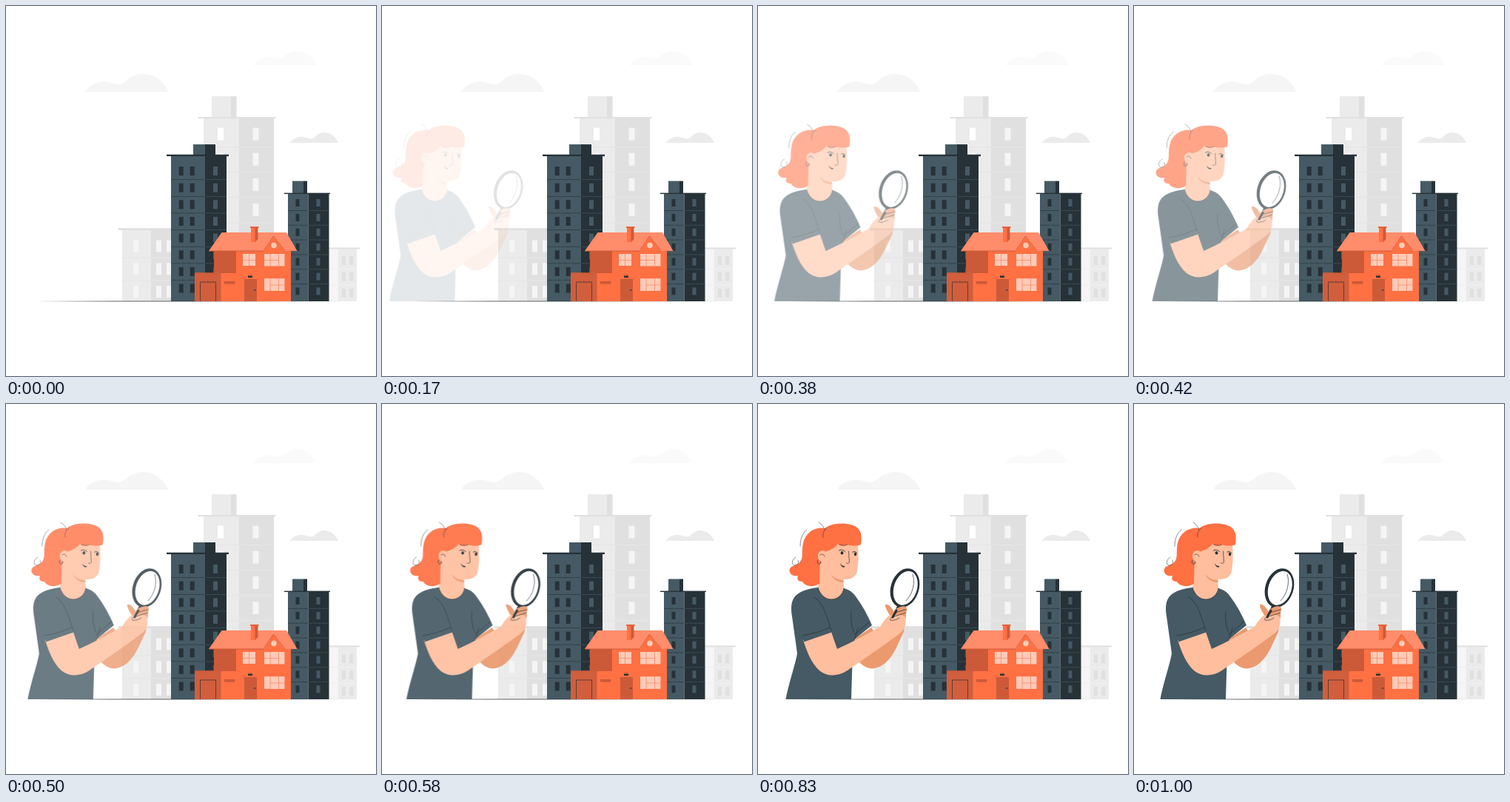
Write an HTML page that moves like this. It is 500 px wide and 500 px high and loops after 1.04 s.

```html
<!DOCTYPE html>
<html lang="en">
<head>
<meta charset="utf-8">
<title>House search</title>
<style>
  html, body { margin: 0; width: 100%; height: 100%; overflow: hidden; background: #fff; }
  svg { display: block; width: 100%; height: 100%; }
  .woman { animation: enter 1040ms infinite; }
  @keyframes enter {
    0%, 12.39% { opacity: 0; transform: translateX(-27.4px); }
    12.4% {
      opacity: .0855; transform: translateX(-27.4px);
      animation-timing-function: cubic-bezier(.305, .323, .501, 1.351);
    }
    93.75%, 100% { opacity: 1; transform: none; }
  }
  .slate { fill: #455a64; }
  .ink { fill: #263238; }
  .skin { fill: #ffbe9d; }
  .tan { fill: #eb996e; }
  .hair { fill: #ff7043; }
  .brick { fill: #ff7043; }
  .rust { fill: #cc5a38; }
  .line { fill: none; stroke: #263238; stroke-width: .7; stroke-linecap: round; stroke-linejoin: round; }
  .frame { fill: none; stroke: #ff8f6d; stroke-width: .9; }
  .pane { fill: #ffcbb9; }
</style>
</head>
<body>
<svg viewBox="0 0 500 500">
  <!-- clouds -->
  <path fill="#f5f5f5" d="M107 116C112 107 123 102 133 102.500C144 103.500 149 107 156 105C164 101 169 92 186 92C203 92 214 104 219.500 116Z"/>
  <path fill="#fafafa" d="M334 80C339 73 347 69 355 69C363 69.500 367 73 372 71C378 67 383 61 394 61C407 61 416 71 419.500 80Z"/>
  <path fill="#ebebeb" d="M384 185C387 179 394 176.500 401 177C408 178 411 180 415 179C419 177 421 171 430 171C440 171 446 178 449 185Z"/>

  <g id="towers"></g>

  <path class="ink" opacity=".75" d="M40 399L145 398.600L250 398.500L462 399L250 399.500L145 399.400Z"/>

  <!-- house -->
  <g>
    <path class="brick" d="M281 331H385V399H281Z"/>
    <path class="rust" d="M281 331H311V361H281Z"/>
    <path fill="#d15e3c" d="M255 360.500H290.500V399H255Z"/>
    <path class="rust" d="M255 360.500H290.500V361.500H255Z"/>
    <path class="line" d="M262.500 398.500V373H283.500V398.500" stroke-width=".9"/>
    <path fill="#ff8c6b" d="M274 331L291.500 306H379L393.500 331Z"/>
    <path class="rust" d="M274 330.600H348V331.800H274Z" opacity=".8"/>
    <path class="brick" d="M348.500 331.500L361.500 311.500L376.500 331.500Z"/>
    <path d="M348 331L361.500 311L377 331" fill="none" stroke="#d9603d" stroke-width="1"/>
    <circle cx="362" cy="323.500" r="3.800" class="pane"/>
    <path class="brick" d="M331 299H337V319H331Z"/>
    <path class="rust" d="M336.500 299H340.500V315L336.500 319Z"/>
    <path fill="#e5643e" d="M330 298H341.500V300H330Z"/>
    <path class="pane" d="M320 335H337V351H320ZM349 335H376.500V351.500H349ZM349 368.300H376.500V385H349Z"/>
    <path class="frame" d="M328.500 335V351M320 343.500H337M357 335V351.500M368.500 335V351.500M349 343.500H368.500M357 368.300V385M368.500 368.300V385M357 377H376.500"/>
    <path class="rust" d="M322 369H339V399H322ZM295 372H309.500V375.700H295Z"/>
    <circle class="ink" cx="336.200" cy="384" r=".9"/>
    <path class="ink" d="M327 364.500H333V367H327Z"/>
  </g>

  <g class="woman">
    <!-- far arm -->
    <path class="tan" d="M129 317L151 302L156 309L180 288L197 290L195 308C187 324 182 339 172 348C163 357 151 360 143 355C137 352 133 347 131 342Z"/>
    <!-- magnifier -->
    <path class="line" d="M188 273L182 286" style="stroke-width:3.6"/>
    <g transform="rotate(18 196.500 248.500)">
      <path class="ink" fill-rule="evenodd" d="M177.500 248.500a19 27 0 1 0 38 0a19 27 0 1 0 -38 0ZM181.700 248.500a15.600 23.600 0 1 0 31.200 0a15.600 23.600 0 1 0 -31.200 0Z"/>
    </g>
    <path class="line" d="M207 230C211 241 207 257 198 266"/>
    <!-- shirt -->
    <path class="slate" d="M79 248C68 249 55 252 48 260C43 266 42 275 44 287L51 337C49 350 40 376 35.500 399H124L125.500 349L129 317.500L152 299C146 285 139 272 130 260C126 254 121 251 114 249Z"/>
    <!-- far sleeve folds -->
    <path class="line" d="M128 312L149 294M124 281C123 290 124 300 128 309M129 317L133 302"/>
    <!-- neck -->
    <path class="skin" d="M81 212C81 226 81 238 79 248C82 258 89 264 97 264C106 264 113 257 114 249L113 236L104 215Z"/>
    <path class="line" d="M79 248C82 258 89 264 97 264C106 264 113 257 114 249"/>
    <path class="tan" d="M97 230C101 236 107 238 113.500 238V241C106 241 99 237 97 230Z"/>
    <!-- ponytail and head -->
    <path class="hair" d="M90 168C76 165 62 173 59 188C56 202 61 209 52 216C47 219 40 219 40.500 226C42 232 48 233 52 232C50 237 52 240 58 240C62 247 73 248 81 243L82 200Z"/>
    <path class="skin" d="M84 190C92 176 126 180 133 190C134 203 134 217 131.500 228C129 235 121 237.500 114 237C104 236 96 229 92 221Z"/>
    <path class="hair" d="M83 206C77 193 80 174 91 166C102 160 122 160 132 167C139 173 138 182 137 190C132 192 124 192 119 190C114 193 109 192 106 189C103 194 95 198 90 199L88 214L82 215Z"/>
    <path class="skin" d="M90 200C84 195 78 200 79 207C80 213 85 217 90 214Z"/>
    <path class="line" d="M82 204C84 202 87 203 88 206M79 211C77 214 79 217 82 216C83 215 83 213 82 212"/>
    <path class="line" d="M80 160C84 162 87 166 88 170M86 180C85 174 88 169 91 168M49 207C43 210 43 218 48 218C52 218 54 214 52 211M64 170C58 174 55 183 55 192M119 190C115 192 111 191 108 190" style="stroke-width:.55"/>
    <!-- face -->
    <ellipse class="ink" cx="111.500" cy="201.300" rx="1.800" ry="2.300"/>
    <ellipse class="ink" cx="129.500" cy="203" rx="1.700" ry="2.300"/>
    <path class="line" d="M107.500 198C110 196.500 113 197 115.500 199.500M126 200C128 199 130 199.500 131.500 201.500" style="stroke-width:1"/>
    <path class="line" d="M120.500 199L121.500 214C120.500 215.500 119 215.500 117.500 215"/>
    <path class="ink" d="M109 215C110 217.500 113 219.500 115.500 219C115 222 110 221 109 215Z"/>
    <!-- far hand -->
    <path class="tan" d="M182 279C186 275 194 272 198 274C200 277 199 280 197.500 282C199 285 198 291 195 295L181 293Z"/>
    <!-- near arm and hand -->
    <path class="skin" d="M59 319L97 308L105 331C125 322 145 311 163 301C167 294 171 289 176 285C173 280 170 275 170 271C175 270 178 275 181 280L184 286C189 284 195 285 197 288C198 295 198 303 191 309C170 325 142 344 119 360C105 369 91 368 82 361C70 351 64 334 59 319Z"/>
    <path class="tan" d="M170 271C175 270 179 276 182 281L184 277L186 279L181 287L176 285C173 280 170 275 170 271Z"/>
    <path class="line" d="M185 279L180 288" style="stroke-width:3"/>
    <path class="line" d="M180 288C184 286 193 284 198 282M184 282C188 280 194 279 198 278M180 288C177 289 176 290 177 292C182 293 186 291 189 289"/>
    <!-- near sleeve -->
    <path class="slate" d="M48 260C64 255 81 263 88 280L99 308L60 321.500Z"/>
    <path class="line" d="M74 261C86 268 90 285 97 306M58 313C71 311 84 307 95 302"/>
  </g>
</svg>
<script>
  const rect = (x, y, w, h, fill) =>
    `<rect x="${x}" y="${y}" width="${w}" height="${h}" fill="${fill}"/>`;

  // A two-sided block: left face x..mid, right face mid..end, with rows of windows.
  function tower({ x, mid, end, top, roof, cap, light, dark, trim, panes, cols, size, first, step, rows }) {
    const [rx, rw, rh] = roof;
    let s = rect(x, top, mid - x, 399 - top, light) + rect(mid, top, end - mid, 399 - top, dark);
    if (cap) {
      const [cx, cm, ce, cy] = cap;
      s += rect(cx, cy, cm - cx, top - cy, light) + rect(cm, cy, ce - cm, top - cy, dark);
    }
    s += rect(rx, top - rh, rw, rh, trim);
    for (let i = 0; i < rows; i++) {
      const y = first + i * step;
      for (const c of cols) s += rect(c, y, size[0], size[1], panes[c < mid ? 0 : 1]);
      if (i < rows - 1) {
        const ly = y + (size[1] + step) / 2;
        s += rect(x, ly, mid - x, .6, dark) + rect(mid, ly, end - mid, .6, light);
      }
    }
    return s;
  }

  const pale = { light: '#ebebeb', dark: '#e0e0e0', trim: '#e0e0e0', panes: ['#f5f5f5', '#f5f5f5'] };
  const night = { light: '#455a64', dark: '#263238', trim: '#263238', panes: ['#263238', '#455a64'] };

  document.getElementById('towers').innerHTML = [
    { ...pale, x: 267, mid: 315, end: 362, top: 152, roof: [259.5, 105, 2], cap: [278, 303.5, 311.5, 122],
      panes: ['#fff', '#f5f5f5'], cols: [286, 333.5], size: [8, 17], first: 164.5, step: 34.2, rows: 6 },
    { ...pale, x: 157, mid: 196, end: 226, top: 303, roof: [151.5, 74, 2.8],
      cols: [172, 203, 217], size: [7, 16], first: 316.5, step: 30.8, rows: 3 },
    { ...pale, light: '#f5f5f5', dark: '#ebebeb', panes: ['#e0e0e0', '#e0e0e0'],
      x: 436, mid: 449, end: 474, top: 328.5, roof: [436, 42, 2],
      cols: [454, 464], size: [5, 12], first: 338, step: 22, rows: 3 },
    { ...night, x: 223, mid: 269, end: 298, top: 203, roof: [217, 84, 2.3], cap: [253, 269, 283, 187],
      cols: [233.7, 248.7, 280], size: [6, 12], first: 217, step: 22.65, rows: 8 },
    { ...night, x: 381, mid: 408.5, end: 436.5, top: 254, roof: [376, 62, 1.4], cap: [387, 402, 407, 236.5],
      cols: [391.5, 419.5], size: [5, 10], first: 261, step: 19.9, rows: 7 }
  ].map(tower).join('');
</script>
</body>
</html>
```
